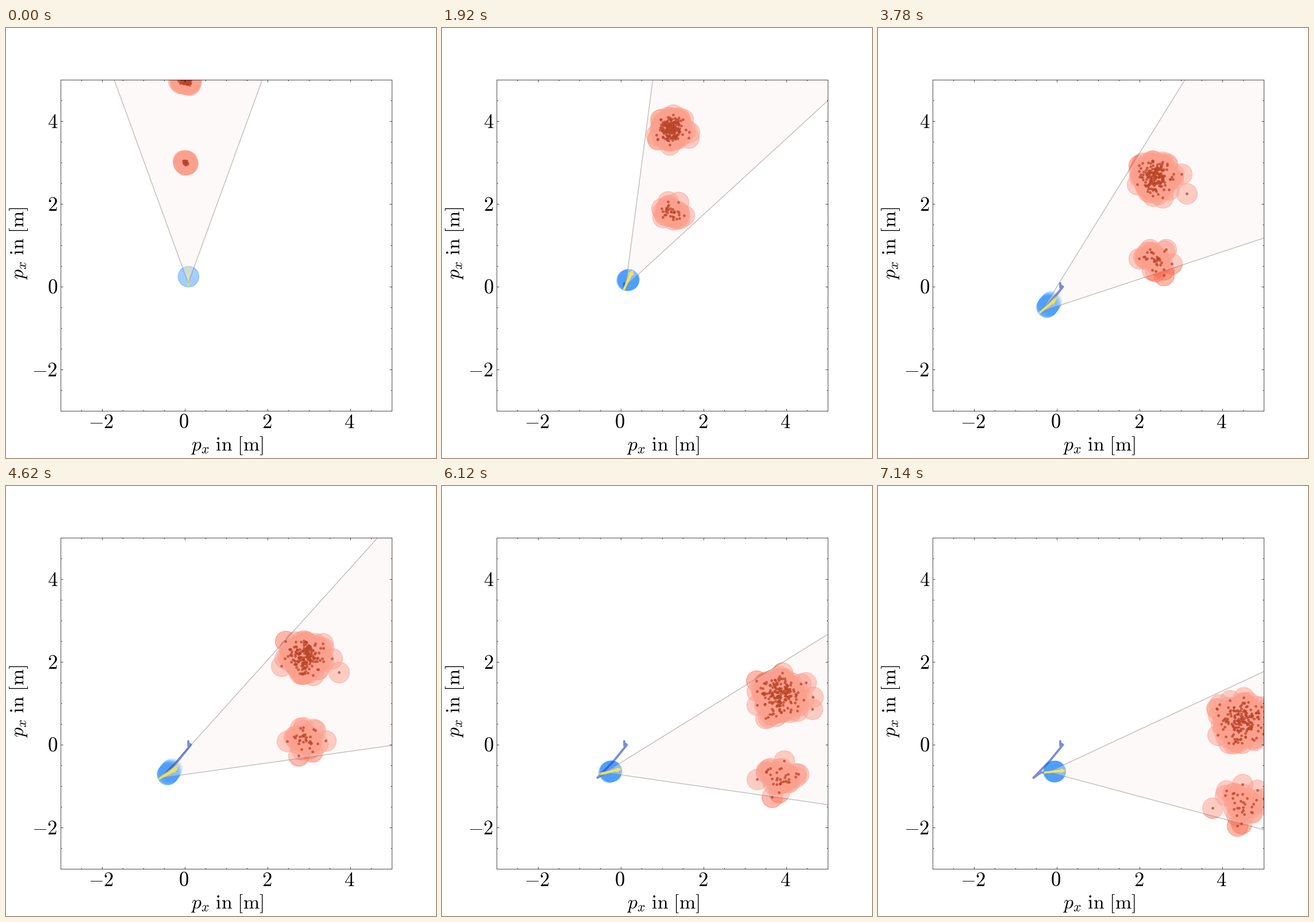
Animation, 748 px wide and 748 px high, one loop 7.2 s. Source, as a matplotlib script:

```python
import numpy as np
import matplotlib.pyplot as plt
from matplotlib.animation import FuncAnimation
from matplotlib.collections import PolyCollection
from matplotlib.patches import Polygon

plt.rcParams["mathtext.fontset"] = "cm"

SIZE, DPI, SCALE = 748, 100, 72      # SCALE: pixels per metre
FRAMES, STEP_MS = 120, 60
TRAIL = 10
LEFT, TOP, SIDE = 95.4, 90, 576      # plot area in pixels
ORIGIN = np.array([LEFT + 3 * SCALE, TOP + 5 * SCALE])

BLUE = (0.29, 0.62, 1.0)
YELLOW = (1.0, 0.90, 0.30)
CORAL = (1.0, 0.45, 0.345)
RUST = (0.73, 0.27, 0.165)
INDIGO = (0.14, 0.27, 0.72)

rng = np.random.default_rng(11)
steps = np.arange(FRAMES)


def metres(px):
    """Stage pixels to axis units."""
    return (px - ORIGIN) / [SCALE, -SCALE]


# Robot poses: step, centre x and y in pixels, degrees clockwise from up
poses = np.array([
    (0, 317, 432, 0),
    (18, 319.5, 440, 10.6),
    (32, 325, 438, 27.5),
    (37, 328, 440, 32),
    (49, 307, 469, 41.5),
    (77, 281, 502, 62),
    (102, 295, 496, 78.2),
    (110, 305, 497, 82),
    (119, 308.5, 496.5, 85),
])
x, y, turn = (np.interp(steps, poses[:, 0], col) for col in poses.T[1:])
heading = np.radians(turn)
centre = metres(np.stack([x, y], axis=1))
forward = np.stack([np.sin(heading), np.cos(heading)], axis=1)
apex = centre - forward * 12 / SCALE


def swarm(y0, count, spread):
    """Particles diffusing around a mean that drifts down and right."""
    walk = rng.normal(0, 1.62, (FRAMES, count, 2))
    walk[0] = rng.normal(0, spread, (count, 2))
    walk = walk.cumsum(axis=0)
    walk -= walk.mean(axis=1, keepdims=True)
    mean = np.stack([312 + 2.7 * steps, y0 + 2.68 * steps], axis=1)
    return metres(walk + mean[:, None])


particles = np.concatenate([swarm(90, 170, 4.2), swarm(234, 32, 2.2)], axis=1)

ARROW = np.array([(-18.5, -1.7), (10.5, -1.7), (10.5, -4), (18.5, 0),
                  (10.5, 4), (10.5, 1.7), (-18.5, 1.7)]) / SCALE


def arrow(k):
    f = forward[k]
    side = np.array([f[1], -f[0]])
    return centre[k] + ARROW[:, :1] * f + ARROW[:, 1:] * side


def cone(k):
    rays = heading[k] + np.radians([-20, 20])
    ends = apex[k] + 20 * np.stack([np.sin(rays), np.cos(rays)], axis=1)
    return np.vstack([ends[0], apex[k], ends[1]])


fig = plt.figure(figsize=(SIZE / DPI, SIZE / DPI), dpi=DPI, facecolor="white")
ax = fig.add_axes([LEFT / SIZE, 1 - (TOP + SIDE) / SIZE,
                   SIDE / SIZE, SIDE / SIZE])
ax.set(xlim=(-3, 5), ylim=(-3, 5))
ticks = range(-2, 5, 2)
for axis in (ax.xaxis, ax.yaxis):
    axis.set_ticks(ticks)
    axis.set_ticks(np.arange(-2.5, 5, 0.5), minor=True)
ax.tick_params(which="both", direction="in", top=True, right=True, width=0.5,
               labelbottom=False, labelleft=False)
ax.tick_params(which="major", length=3)
ax.tick_params(which="minor", length=1.5)
for spine in ax.spines.values():
    spine.set_linewidth(0.5)


def label(x, y, text, size=25, ha="center", **kw):
    fig.text(x / SIZE, 1 - y / SIZE, text, ha=ha, va="baseline",
             fontsize=size, color="black", **kw)


for v in ticks:
    label(309.5 + SCALE * v, 696, f"${v}$")
    label(90, 462 - SCALE * v, f"${v}$", ha="right")
title = r"$p_x\ \mathrm{in}\ \mathrm{[m]}$"
label(384, 735, title, size=24.4)
label(31, 375, title, size=24.4, rotation=90, rotation_mode="anchor")


def discs(radius, color, alpha, z, lw=1.0):
    size = (2 * radius * 72 / DPI) ** 2
    rgba = (*color, alpha)
    return ax.scatter([], [], s=size, facecolors=[rgba], edgecolors=[rgba],
                      linewidths=lw, zorder=z)


halos = discs(18, CORAL, 0.5, 1.0)
body = discs(18, BLUE, 0.5, 1.1)
view = Polygon(cone(0), closed=True, facecolor=(0.978, 0.937, 0.93, 0.364),
               edgecolor=(0.5, 0.5, 0.5, 0.5), linewidth=1, zorder=1.2)
ax.add_patch(view)
path, = ax.plot([], [], color=INDIGO, alpha=0.6, lw=2.8,
                solid_capstyle="round", solid_joinstyle="round", zorder=1.3)
dots = discs(1.8, RUST, 0.7, 1.4, lw=0.8)
arrows = PolyCollection([], edgecolors="none", zorder=1.5)
ax.add_collection(arrows, autolim=False)


def draw(k):
    halos.set_offsets(particles[k])
    dots.set_offsets(particles[k])
    view.set_xy(cone(k))
    path.set_data(*apex[:k + 1].T)

    # The last poses stay visible and fade with age
    recent = np.arange(max(0, k - TRAIL + 1), k + 1)
    fade = 0.5 * (1 - (k - recent) / TRAIL)
    tint = [(*BLUE, a) for a in fade]
    body.set_offsets(centre[recent])
    body.set_facecolor(tint)
    body.set_edgecolor(tint)
    arrows.set_verts([arrow(i) for i in recent])
    arrows.set_facecolor([(*YELLOW, a) for a in fade])
    return halos, body, view, path, dots, arrows


anim = FuncAnimation(fig, draw, frames=FRAMES, interval=STEP_MS,
                     repeat=True, repeat_delay=0, blit=False)
plt.show()
```
